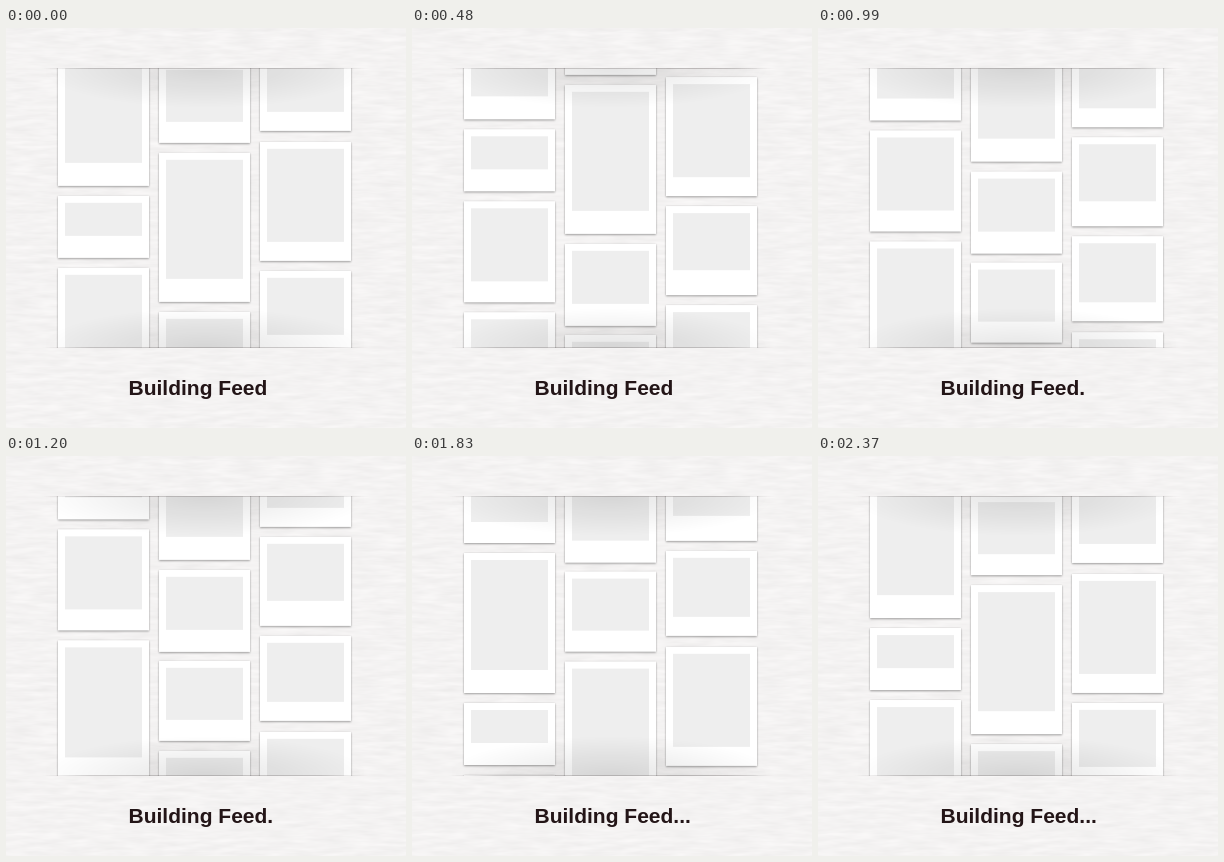
Write an HTML page that moves like this. It is 400 px wide and 400 px high and loops after 2400 ms.

```html
<!DOCTYPE html>
<html lang="en">
<head>
<meta charset="utf-8">
<title>Building Feed</title>
<style>
  html, body { margin: 0; width: 100%; height: 100%; overflow: hidden; background: #f4f2f2; }
  body { position: relative; }
  body > *, .column, .card, .photo { position: absolute; }
  #paper { left: 0; top: 0; }
  #feed { left: 40px; top: 40px; width: 318px; height: 280px; overflow: hidden; }
  .column { top: -40px; will-change: transform; }
  .card { width: 91px; background: #fff; box-shadow: 0 1px 2px rgba(0, 0, 0, .34), 0 0 2px rgba(0, 0, 0, .1); }
  .photo { left: 7px; top: 7px; width: 77px; background: #eee; }
  #shade {
    left: 40px; top: 40px; width: 318px; height: 280px;
    background:
      radial-gradient(ellipse 165px 40px at 50% 0, rgba(0, 0, 0, .1), transparent),
      radial-gradient(ellipse 165px 40px at 50% 100%, rgba(0, 0, 0, .1), transparent);
  }
  .rule {
    left: 36px; width: 326px; height: 1px;
    background: linear-gradient(90deg, transparent, rgba(60, 50, 50, .22) 15% 85%, transparent);
  }
  #label {
    left: 122.5px; top: 348px; white-space: pre; color: #231517;
    font: bold 21px/24px "Liberation Sans", Arial, sans-serif;
  }
</style>
</head>
<body>
<svg id="paper" width="400" height="400">
  <filter id="fibres" x="0" y="0" width="100%" height="100%" color-interpolation-filters="sRGB">
    <feTurbulence type="fractalNoise" baseFrequency=".035 .22" numOctaves="3" seed="4"/>
    <feColorMatrix values="0 0 0 .06 .926  0 0 0 .06 .92  0 0 0 .06 .919  0 0 0 0 1"/>
  </filter>
  <rect width="400" height="400" filter="url(#fibres)"/>
</svg>
<div id="feed"></div>
<div id="shade"></div>
<div class="rule" style="top:40px"></div>
<div class="rule" style="top:319px"></div>
<div id="label"></div>
<script>
const LOOP = 2400;
const feed = document.getElementById('feed');
const label = document.getElementById('label');

// Each column scrolls up by its span once per loop; cards are [top, height, photo height].
const columns = [
  { x: 52, span: 333, cards: [[18, 140, 110], [168, 62, 33], [240, 101, 73]] },
  { x: 153, span: 340, cards: [[35.3, 79.5, 52], [125, 149, 119], [284, 82, 53]] },
  { x: 254, span: 324, cards: [[18, 85, 59], [114, 119, 93], [243, 89, 57]] }
];

function addBox(parent, className, style) {
  const box = document.createElement('div');
  box.className = className;
  Object.assign(box.style, style);
  return parent.appendChild(box);
}

for (const column of columns) {
  column.el = addBox(feed, 'column', { left: column.x - 40 + 'px' });
  for (const offset of [0, column.span]) {
    for (const [top, height, photo] of column.cards) {
      const card = addBox(column.el, 'card', { top: top + offset + 'px', height: height + 'px' });
      addBox(card, 'photo', { height: photo + 'px' });
    }
  }
}

function draw(now) {
  const t = now % LOOP;
  for (const { el, span } of columns) {
    el.style.transform = `translateY(${-span * t / LOOP}px)`;
  }
  const dots = Math.max(0, Math.floor((t - 15) / 600));
  label.textContent = 'Building Feed' + '.'.repeat(dots);
  requestAnimationFrame(draw);
}
draw(0);
</script>
</body>
</html>
```
